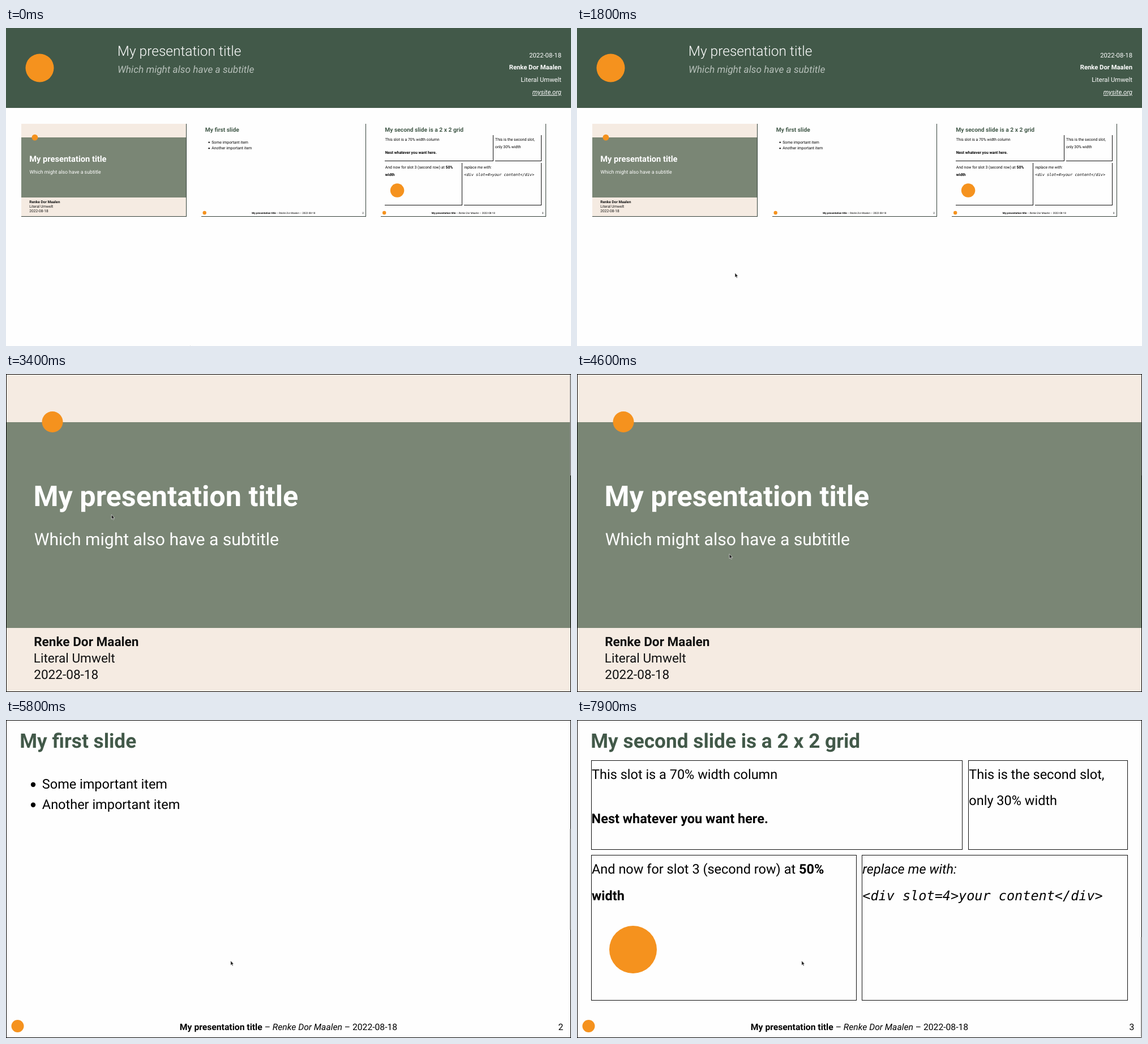
Write an HTML page that moves like this. It is 998 px wide and 561 px high and loops after 8000 ms.

```html
<!DOCTYPE html>
<html lang="en">
<head>
<meta charset="utf-8">
<title>Slides</title>
<style>
  html, body { margin: 0; width: 100%; height: 100%; overflow: hidden; background: #fefefe; }
  svg { display: block; width: 100%; height: 100%; }
  text { font-family: Roboto, sans-serif; text-rendering: geometricPrecision; white-space: pre; }
  rect, .edge { shape-rendering: crispEdges; }
  .edge { fill: none; vector-effect: non-scaling-stroke; }
  .b { font-weight: 700; }
  .i { font-style: italic; }
  .l { font-weight: 300; }
  .u { text-decoration: underline; }
  .m { font-family: "DejaVu Sans Mono", monospace; font-style: italic; }
  .tip { font-family: "Noto Sans", sans-serif; }
</style>
</head>
<body>
<svg id="stage" viewBox="0 0 998 561"></svg>
<script>
const LOOP = 8000, STEP = 100, SCALE = 0.2916;
const GREEN = '#425949', SAGE = '#7a8675', CREAM = '#f5ebe2', PAPER = '#fefefe', LOGO = '#f5921e';
const TITLE = 'My presentation title', SUBTITLE = 'Which might also have a subtitle';
const AUTHOR = 'Renke Dor Maalen', ORG = 'Literal Umwelt', DATE = '2022-08-18';
const THUMB_X = [27, 344.7, 662.2], THUMB_Y = 168.5;

const text = (x, y, size, str, cls = '', fill = '#000', anchor = 'start') =>
  `<text x="${x}" y="${y}" font-size="${size}" class="${cls}" fill="${fill}" text-anchor="${anchor}">${str}</text>`;
const rect = (x, y, w, h, fill, extra = '') =>
  `<rect x="${x}" y="${y}" width="${w}" height="${h}" fill="${fill}" ${extra}/>`;
const edge = (d, color) => `<path class="edge" d="${d}" stroke="${color}"/>`;
const logo = (x, y, r) => `<circle cx="${x}" cy="${y}" r="${r}" fill="${LOGO}"/>`;
const span = (str, cls) => `<tspan class="${cls}">${str}</tspan>`;

function footer(page) {
  const line = `${span(TITLE, 'b')} – ${span(AUTHOR, 'i')} – ${DATE}`;
  return logo(20.5, 540, 11) + text(499, 546.5, 15.7, line, '', '#000', 'middle') +
    text(980, 546.5, 15.7, page, '', '#000', 'middle');
}

// A one-pixel border inside the box; thumbnails keep only its right and bottom edge.
function cell(x, y, r, b, thumb) {
  const inset = thumb ? 0.5 / SCALE : 0.5;
  const right = r - inset, bottom = b - inset;
  return edge(thumb
    ? `M${x} ${bottom}H${right}V${y}`
    : `M${x + inset} ${y + inset}H${right}V${bottom}H${x + inset}Z`, '#111');
}

const heading = str => text(24.3, 48.8, 35.2, str, 'b', GREEN);

const slides = [
  () => rect(0, 0, 998, 561, CREAM) + rect(0, 85, 998, 362.5, SAGE) + logo(82, 84.5, 18.5) +
    text(48.5, 232.7, 50.3, TITLE, 'b', '#fff') +
    text(49.7, 302, 30.1, SUBTITLE, '', '#fff') +
    text(49.2, 480.3, 22.6, AUTHOR, 'b', '#111') +
    text(48.8, 509, 22.6, ORG, '', '#111') +
    text(49.2, 538, 22.6, DATE, '', '#111'),

  () => rect(0, 0, 998, 561, PAPER) + heading('My first slide') +
    ['Some important item', 'Another important item'].map((item, i) =>
      `<circle cx="48" cy="${114 + 35.7 * i}" r="4.2"/>` + text(63.8, 121 + 35.7 * i, 23.5, item)).join('') +
    footer(2),

  thumb => rect(0, 0, 998, 561, PAPER) + heading('My second slide is a 2 x 2 grid') +
    cell(25, 71, 681, 229, thumb) + cell(691, 71, 973, 229, thumb) +
    cell(25, 238, 494, 495, thumb) + cell(503, 238, 973, 495, thumb) +
    text(26, 103.8, 23.5, 'This slot is a 70% width column') +
    text(25.6, 181.8, 23.5, 'Nest whatever you want here.', 'b') +
    text(692.3, 103.8, 23.5, 'This is the second slot,') +
    text(692.3, 150.3, 23.5, 'only 30% width') +
    text(26, 271.2, 23.5, 'And now for slot 3 (second row) at ' + span('50%', 'b')) +
    text(26, 317.5, 23.5, 'width', 'b') + logo(99, 405, 42) +
    text(504.3, 271.2, 23.5, 'replace me with:', 'i') +
    text(504.3, 317.5, 23.5, '&lt;div slot=4&gt;your content&lt;/div&gt;', 'm') +
    footer(3)
];

function overview() {
  const right = (y, str, cls = '') => text(981, y, 11.25, str, cls, '#fff', 'end');
  const thumbs = THUMB_X.map((x, i) =>
    `<g transform="translate(${x} ${THUMB_Y}) scale(${SCALE})">${slides[i](true)}</g>` +
    edge(`M${x} ${THUMB_Y + 164}H${x + 291.2}V${THUMB_Y}`, '#35423b'));
  return rect(0, 0, 998, 561, PAPER) + rect(0, 0, 998, 141, GREEN) + logo(59.5, 70.5, 25) +
    text(196.8, 49, 24.5, TITLE, 'l', '#fff') +
    text(197, 78.5, 17.3, SUBTITLE, 'i', '#b7c0ba') +
    right(51.5, DATE) + right(73.4, AUTHOR, 'b') + right(95.3, ORG) + right(117.3, 'mysite.org', 'i u') +
    thumbs.join('') +
    rect(24, 165.7, 296.3, 168.9, 'none', 'id="hover" stroke="#959780" stroke-width="5.4"');
}

const full = i => `<g id="full${i}">${slides[i](false)}` +
  rect(0.5, 0.5, 997, 560, 'none', 'stroke="#000"') + '</g>';

const $ = id => document.getElementById(id);
$('stage').innerHTML = `<g id="overview">${overview()}</g>` + full(0) + full(1) + full(2) +
  rect(996, 0, 2, 178, '#8c8c8c', 'id="bar"') +
  `<g id="tip">${rect(397.7, 436, 51, 24.3, '#000', 'rx="3" fill-opacity=".86"')}` +
  text(423, 451.4, 8.4, 'Titlepage', 'tip', '#fff', 'middle') + '</g>' +
  '<path id="cursor" d="M0 0V8L1.8 6.4L3 9.2L4.4 8.6L3.2 5.9H5.6Z" fill="#1c1c1c" stroke="#fff" stroke-width=".6"/>';

// Pointer stops: time, x, y
const stops = [[900, 325, 560], [1500, 298, 453], [1700, 298, 453], [1800, 279, 432], [2000, 237, 366],
  [2100, 237, 366], [2600, 186.3, 248], [4300, 186.3, 248], [5000, 396.8, 424.7]];
const clamp = v => Math.max(0, Math.min(1, v));
const ease = p => p * p * (3 - 2 * p);

function pointer(t) {
  let [, x, y] = stops[0];
  for (let i = 1; i < stops.length; i++) {
    const [t0, x0, y0] = stops[i - 1], [t1, x1, y1] = stops[i];
    if (t < t0) break;
    const p = ease(clamp((t - t0) / (t1 - t0)));
    x = x0 + (x1 - x0) * p;
    y = y0 + (y1 - y0) * p;
  }
  return [x, y];
}

// The scrollbar shows on each scroll, then fades after a second.
function barOpacity(t) {
  const shown = [3400, 5700, 5800, 7500].filter(s => s <= t).pop();
  return shown === undefined ? 0 : 1 - clamp((t - shown - 900) / 400);
}

const show = (id, on) => $(id).setAttribute('display', on ? 'inline' : 'none');

function draw(t) {
  const page = t < 3400 ? -1 : t < 5800 ? 0 : t < 7500 ? 1 : 2;
  const [x, y] = pointer(t);
  show('overview', page < 0);
  for (let i = 0; i < 3; i++) show('full' + i, page === i);
  show('hover', x > 27 && x < 318 && y > 168 && y < 332);
  show('tip', t >= 5500 && t < 5800);
  $('bar').setAttribute('y', 1 + 191 * Math.max(page, 0));
  $('bar').setAttribute('opacity', barOpacity(t));
  $('cursor').setAttribute('transform', `translate(${x} ${y})`);
}

const start = performance.now();
function tick() {
  const t = (performance.now() - start) % LOOP;
  draw(Math.floor(t / STEP) * STEP);
  requestAnimationFrame(tick);
}
tick();
</script>
</body>
</html>
```
